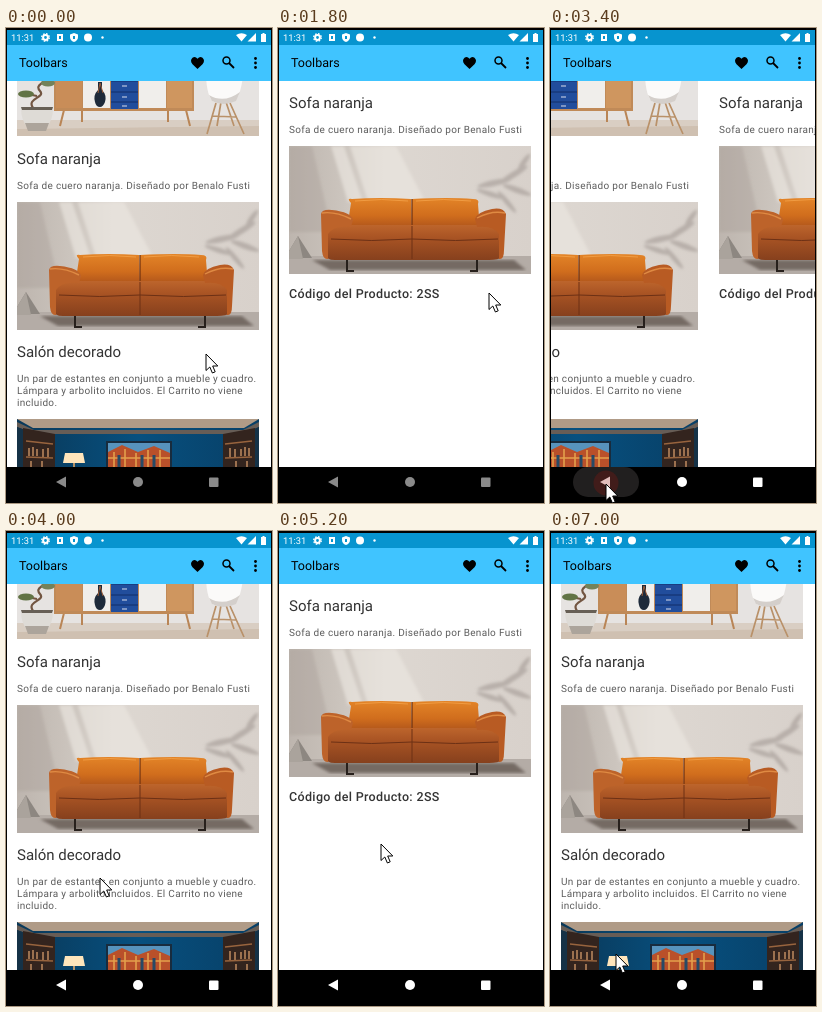
These frames come from a looping animation (266 by 475 pixels, 7200 ms). An HTML page:

```html
<!DOCTYPE html>
<html lang="es">
<head>
<meta charset="utf-8">
<title>Toolbars</title>
<style>
  html, body { margin: 0; width: 100%; height: 100%; overflow: hidden; background: #000; }
  svg { display: block; width: 266px; height: 475px; }
  text { font-family: Roboto, Arial, sans-serif; text-rendering: geometricPrecision; }
  .head { font-size: 15px; fill: #333; }
  .body { font-size: 10px; letter-spacing: .31px; fill: #5c5c5c; }
  .code { font-size: 12.5px; font-weight: 500; letter-spacing: .34px; fill: #333; }
</style>
</head>
<body>
<svg viewBox="0 0 266 475">
  <defs>
    <clipPath id="page"><rect x="1" y="53" width="264" height="386"/></clipPath>
    <clipPath id="sofaBox"><rect x="11" y="174" width="242" height="128"/></clipPath>
    <filter id="soft"><feGaussianBlur stdDeviation="1.6"/></filter>
    <linearGradient id="wall">
      <stop offset="0" stop-color="#bdb5ae"/><stop offset=".22" stop-color="#cbc4bd"/>
      <stop offset=".4" stop-color="#ddd7d1"/><stop offset="1" stop-color="#d8d1cb"/>
    </linearGradient>
    <linearGradient id="back" x2="0" y2="1">
      <stop offset="0" stop-color="#e38427"/><stop offset=".55" stop-color="#d06d1d"/>
      <stop offset="1" stop-color="#a9501b"/>
    </linearGradient>
    <linearGradient id="seat" x2="0" y2="1">
      <stop offset="0" stop-color="#bd652c"/><stop offset=".35" stop-color="#a95424"/>
      <stop offset="1" stop-color="#86401d"/>
    </linearGradient>
    <linearGradient id="blue">
      <stop offset="0" stop-color="#0a3858"/><stop offset=".5" stop-color="#07507f"/>
      <stop offset="1" stop-color="#083f66"/>
    </linearGradient>
  </defs>

  <rect width="266" height="475"/>
  <rect x="1" y="53" width="264" height="386" fill="#fff"/>

  <g clip-path="url(#page)">
    <g id="list">
      <!-- sideboard -->
      <rect x="11" y="40" width="242" height="68" fill="#e6e3e1"/>
      <path d="M11 92H253V108H11Z" fill="#d9cec3"/>
      <path d="M11 101L253 98V108H11Z" fill="#cfc0b1"/>
      <path d="M58 82L54 98M180 82L184 98M76 82V94M162 82V94" stroke="#b98556" stroke-width="2"/>
      <rect x="48" y="48" width="140" height="35" fill="#c08a58"/>
      <rect x="50" y="48" width="26" height="32" fill="#c98d58"/>
      <rect x="77" y="48" width="27" height="32" fill="#f0eeeb"/>
      <rect x="105" y="48" width="27" height="33" fill="#214d9c"/>
      <path d="M105 53H132M105 64H132M105 74H132" stroke="#122e68" stroke-width="1.2"/>
      <path d="M116 58H121M116 69H121M116 78H121" stroke="#d9dcea"/>
      <rect x="133" y="48" width="27" height="32" fill="#f0eeeb"/>
      <rect x="161" y="48" width="25" height="32" fill="#cf965f"/>
      <path d="M92 54H96V62Q101 67 99 74Q97 79 94 79Q90 79 89 74Q87 67 92 62Z" fill="#1e2a3a"/>
      <path d="M92 65L94 55L97 65" stroke="#9b5b37" fill="none"/>
      <path d="M27 80C20 70 40 70 34 63S40 56 38 50M31 68L21 66" stroke="#725541" stroke-width="2.2" fill="none"/>
      <ellipse cx="20" cy="66" rx="8" ry="3.5" fill="#617345"/>
      <ellipse cx="42" cy="55" rx="7" ry="3.5" fill="#74825a"/>
      <path d="M15 79H47Q47 93 40 100H22Q15 93 15 79Z" fill="#dedbd6"/>
      <path d="M15 79H47L46 82H16Z" fill="#675f55"/>
      <path d="M19 95H43L40 103H22Z" fill="#aca49b"/>
      <path d="M210 75L201 106M224 75L238 106M215 74L211 98M220 74L228 98M206 88L230 89" stroke="#b99169" stroke-width="1.7"/>
      <path d="M200 48Q201 70 208 74H226Q234 72 237 48Z" fill="#fbfaf9"/>
      <path d="M203 67Q218 76 234 64L230 73Q217 79 206 73Z" fill="#d4cfcb"/>

      <!-- sofa entry -->
      <g id="sofa">
        <text class="head" x="11" y="136">Sofa naranja</text>
        <text class="body" x="11" y="160.5">Sofa de cuero naranja. Diseñado por Benalo Fusti</text>
        <g clip-path="url(#sofaBox)">
          <rect x="11" y="174" width="242" height="128" fill="url(#wall)"/>
          <g filter="url(#soft)">
            <path d="M53 174H66L85 230H70ZM72 174H118L150 235H92Z" fill="#ece7e1" opacity=".65"/>
            <path d="M11 174H34L54 260H11Z" fill="#9e958e" opacity=".3"/>
            <g fill="#9d948e" opacity=".55">
              <ellipse cx="235" cy="203" rx="17" ry="3" transform="rotate(-32 235 203)"/>
              <ellipse cx="216" cy="211" rx="17" ry="3" transform="rotate(-12 216 211)"/>
              <ellipse cx="212" cy="222" rx="14" ry="2.5" transform="rotate(18 212 222)"/>
              <ellipse cx="239" cy="218" rx="15" ry="3" transform="rotate(20 239 218)"/>
              <ellipse cx="229" cy="230" rx="14" ry="2.5" transform="rotate(50 229 230)"/>
              <ellipse cx="246" cy="190" rx="10" ry="2.5" transform="rotate(-55 246 190)"/>
            </g>
          </g>
          <path d="M11 284H253V302H11Z" fill="#b4aca6"/>
          <path d="M34 288H236L248 298H52Z" fill="#746a64" filter="url(#soft)"/>
          <path d="M20 264L34 286H11V279Z" fill="#8d8781"/>
          <path d="M20 264L25 287H11V279Z" fill="#aaa39c"/>
          <path d="M69 286V299H76M199 286V299H192" stroke="#27201c" stroke-width="2" fill="none"/>
          <path d="M69 257L73 231Q68 226 74 227Q102 225 133 227L134 258ZM134 258V227Q172 225 195 227Q202 227 200 232L202 258Z" fill="url(#back)"/>
          <path d="M134 227V256" stroke="#75340f" stroke-width="1.3"/>
          <path d="M77 229Q104 226 130 229M138 229Q166 226 193 229" stroke="#f09c43" fill="none"/>
          <path d="M47 258Q52 253 74 253H200Q220 253 224 259V285Q221 288 211 288H57Q48 288 47 282Z" fill="url(#seat)"/>
          <path d="M53 267Q94 270 134 267Q178 270 220 267M134 254V287" stroke="#6c3015" fill="none"/>
          <path d="M43 242Q44 237 54 238Q73 240 75 248L73 255Q56 253 50 262V287Q45 288 44 279Z" fill="#bd632a"/>
          <path d="M228 242Q225 235 214 237Q199 240 197 247L199 255Q215 253 221 262V287Q226 288 226 278Z" fill="#b85b23"/>
          <path d="M44 241Q57 239 73 247M227 241Q214 238 199 246" stroke="#df8a43" stroke-width="1.4" fill="none"/>
        </g>
      </g>

      <!-- lounge entry -->
      <text class="head" x="11" y="329">Salón decorado</text>
      <text class="body" x="11" y="354">Un par de estantes en conjunto a mueble y cuadro.</text>
      <text class="body" x="11" y="366">Lámpara y arbolito incluidos. El Carrito no viene</text>
      <text class="body" x="11" y="378">incluido.</text>
      <rect x="11" y="391" width="242" height="50" fill="url(#blue)"/>
      <path d="M11 391H253L238 400H27Z" fill="#b09b87"/>
      <path d="M11 394L28 402H237L253 394V399L236 406H30L11 399Z" fill="#675d56"/>
      <path d="M11 399L30 406V439H11ZM253 399L236 406V439H253Z" fill="#153247"/>
      <g id="shelf">
        <path d="M17 400L49 406V439H17Z" fill="#33241e"/>
        <path d="M20 413L47 416M20 429L47 430" stroke="#98643e" stroke-width="1.5"/>
        <path d="M23 420V428M27 419V428M31 421V428M37 421V429M42 420V429M25 433V439M36 433V439" stroke="#9c714f" stroke-width="2"/>
      </g>
      <use href="#shelf" transform="matrix(-1 0 0 1 266 0)"/>
      <path d="M59 425H77L79 435H57Z" fill="#ffe5bb"/>
      <path d="M68 435V439" stroke="#b69165" stroke-width="2"/>
      <rect x="100" y="413" width="66" height="28" fill="#182c3e"/>
      <rect x="102" y="415" width="62" height="26" fill="#5793bd"/>
      <path d="M102 424L116 417L132 424L148 418L164 425V439H102Z" fill="#b9502a"/>
      <path d="M102 430H164M108 424V439M119 421V439M130 425V439M142 422V439M154 422V439" stroke="#e3a04c" stroke-width="1.6"/>
      <path d="M113 427V439M136 427V439M148 427V439" stroke="#274a66" stroke-width="3"/>
    </g>

    <g id="detail">
      <rect x="1" y="53" width="264" height="386" fill="#fff"/>
      <use href="#sofa" y="-56"/>
      <text class="code" x="11" y="270">Código del Producto: 2SS</text>
    </g>
  </g>

  <!-- status bar and toolbar -->
  <rect x="1" y="2" width="264" height="15" fill="#0794cf"/>
  <rect x="1" y="17" width="264" height="36" fill="#40c4ff"/>
  <g fill="#fff">
    <text x="5" y="13" font-size="9.4">11:31</text>
    <circle cx="39.5" cy="9.5" r="2.4" fill="none" stroke="#fff" stroke-width="2"/>
    <circle cx="39.5" cy="9.5" r="3.8" fill="none" stroke="#fff" stroke-width="1.3" stroke-dasharray="1.6 1.4"/>
    <path d="M51 6H57V13H51ZM53 8V11H55V8Z" fill-rule="evenodd"/>
    <path d="M68 5L72 6.5V9Q72 12.5 68 14Q64 12.5 64 9V6.5ZM67 8V11H69V8Z" fill-rule="evenodd"/>
    <circle cx="82" cy="9.5" r="4"/>
    <circle cx="96.5" cy="9.5" r="1.2"/>
    <path d="M230 7Q235.500 3.500 241 7L235.500 13.500ZM250 5V13.500H241.500ZM255 6H256.500V5H258.500V6H260V14H255Z"/>
  </g>
  <text x="13" y="39" font-size="12.5">Toolbars</text>
  <path d="M191.500 41L186.500 36.300Q183.500 32.500 186.500 29.700Q189.300 28 191.500 30.800Q193.700 28 196.500 29.700Q199.500 32.500 196.500 36.300Z"/>
  <circle cx="220.500" cy="32.500" r="3.500" fill="none" stroke="#000" stroke-width="1.5"/>
  <path d="M223 35L228 40" stroke="#000" stroke-width="1.8"/>
  <circle cx="249.500" cy="30.500" r="1.4"/><circle cx="249.500" cy="35" r="1.4"/><circle cx="249.500" cy="39.500" r="1.4"/>

  <!-- navigation bar -->
  <rect id="pill" x="23" y="439" width="66" height="30" rx="15" fill="#211f1f"/>
  <g id="nav">
    <path d="M50 454L60 448.500V459.500Z"/>
    <circle cx="132" cy="454" r="5"/>
    <rect x="203" y="449.500" width="9.500" height="9.500" rx="1"/>
  </g>
  <circle id="tap" r="12.500" stroke-dasharray="3 1"/>
  <path id="cursor" d="M0 0V16.500L3.800 13L6.400 19L9.200 17.800L6.700 12H11.800Z" fill="#fff" stroke="#000" stroke-width="1"/>
</svg>
<script>
const LOOP = 7200, STEP = 200, WIDTH = 263, SLIDE = 300;
const el = id => document.getElementById(id);
const move = (id, x, y) => el(id).setAttribute('transform', `translate(${x} ${y})`);

// Cursor path: time, x, y
const path = [
  [0, 200, 326], [400, 190, 352], [800, 196, 300], [1200, 212, 264],
  [1800, 211, 265], [2400, 77, 416], [2800, 56, 456], [3400, 56, 456],
  [4200, 106, 310], [4600, 111, 292], [4800, 111, 292], [5200, 103, 313],
  [5600, 92, 345], [6200, 60, 452], [6400, 64, 434], [6600, 63, 424],
  [7000, 66, 423], [LOOP, 66, 423]
];
// Taps: time from, time to, x, y
const taps = [[1400, 1400, 212, 264], [3200, 3400, 56, 455], [4800, 4800, 111, 291], [6200, 6400, 61, 454]];
// Page slides: start time, page to show (1 = detail)
const slides = [[1399, 1], [3290, 0], [4799, 1], [6308, 0]];

function cursorAt(t) {
  const i = path.findIndex(p => p[0] > t);
  const [t0, x0, y0] = path[i - 1], [t1, x1, y1] = path[i];
  const k = (t - t0) / (t1 - t0);
  return [x0 + (x1 - x0) * k, y0 + (y1 - y0) * k];
}

function pageAt(t) {
  const last = slides.filter(s => s[0] <= t).pop();
  if (!last) return 0;
  const left = (1 - Math.min(1, (t - last[0]) / SLIDE)) ** 2;
  return last[1] ? 1 - left : left;
}

function draw(now) {
  const t = Math.floor(now % LOOP / STEP) * STEP;
  const shift = Math.round(WIDTH * pageAt(t));
  move('list', -shift, 0);
  move('detail', WIDTH - shift, 0);
  move('cursor', ...cursorAt(t).map(Math.round));

  const tap = taps.find(([from, to]) => t >= from && t <= to);
  const onNav = tap && tap[3] > 439;
  el('tap').style.display = tap ? '' : 'none';
  el('pill').style.display = onNav ? '' : 'none';
  if (tap) {
    move('tap', tap[2], tap[3]);
    el('tap').setAttribute('fill', onNav ? 'rgba(150,20,15,.28)' : 'rgba(160,32,4,.85)');
    el('tap').setAttribute('stroke', onNav ? 'none' : '#7c1a08');
  }
  el('nav').setAttribute('fill', t < 3200 ? '#8a8a8a' : '#fff');
}

let start;
function tick(now) {
  start ??= now;
  draw(now - start);
  requestAnimationFrame(tick);
}
draw(0);
requestAnimationFrame(tick);
</script>
</body>
</html>
```
